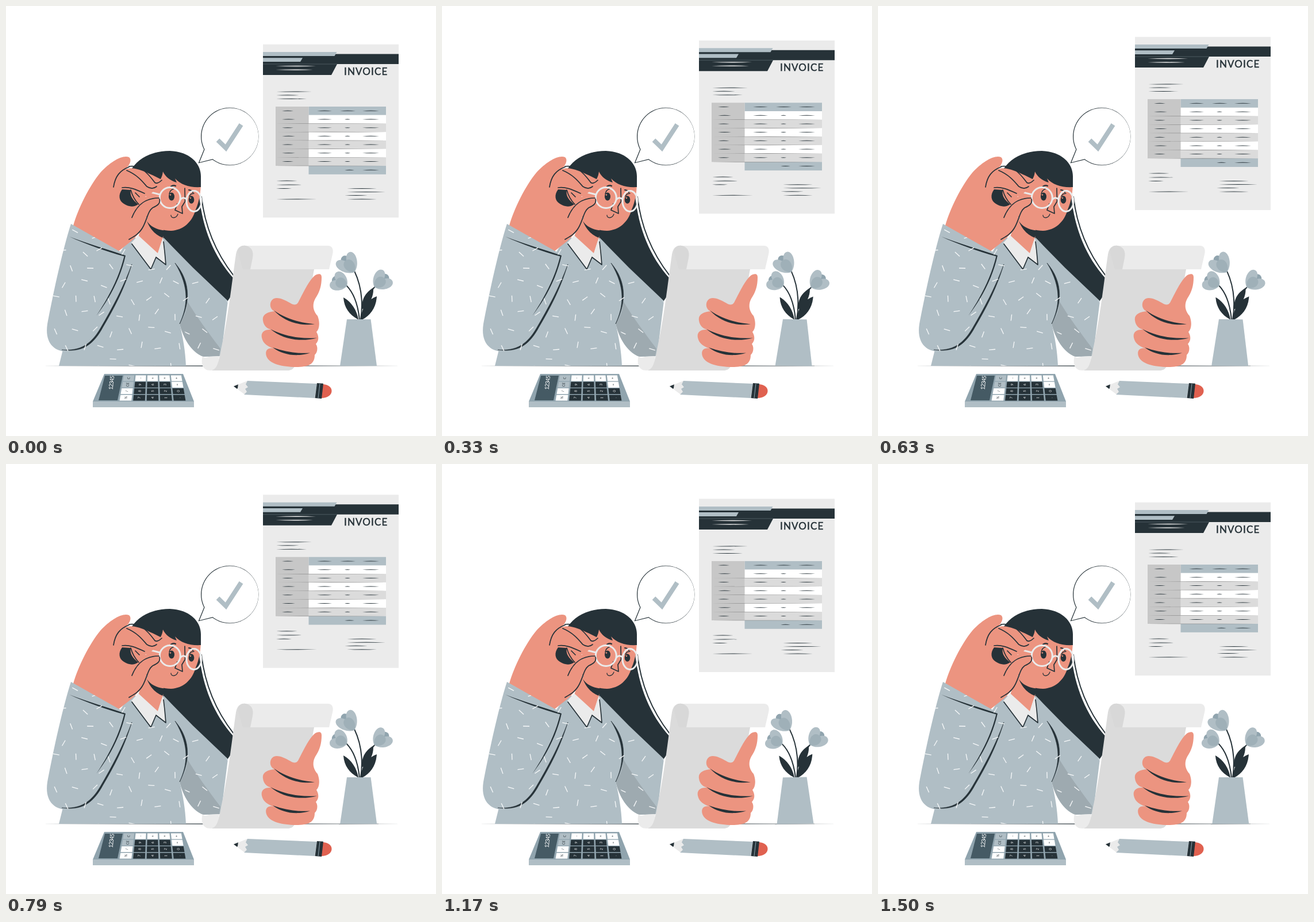
Write an HTML page that moves like this. It is 748 px wide and 748 px high and loops after 1.54 s.

```html
<!DOCTYPE html>
<html lang="en">
<head>
<meta charset="utf-8">
<title>Invoice check</title>
<style>
html, body { margin: 0; width: 100%; height: 100%; overflow: hidden; background: #fff; }
svg { display: block; width: 100vw; height: 100vh; }
.ink { fill: #263238; }
.blue { fill: #b0bec5; }
.pale { fill: #ebebeb; }
.grey { fill: #dbdbdb; }
.skin { fill: #ec9480; }
.pen { fill: none; stroke: #263238; stroke-linecap: round; stroke-linejoin: round; }
.rim { fill: none; stroke: #ebebeb; stroke-width: 3; }
</style>
</head>
<body>
<svg viewBox="0 0 748 748" stroke-width="1.7" xmlns="http://www.w3.org/2000/svg">
  <defs>
    <clipPath id="knit">
      <path d="M92 626L100 597L205 420L220 403L252 456L276 425L386 515L373 609L343 610L303 556L313 626Z"/>
      <path d="M113 379C98 425 80 510 72 553C67 585 83 601 106 601C140 602 158 574 176 543L219 450L207 432Z"/>
    </clipPath>
  </defs>

  <path class="ink" d="M58 626Q374 624.800 691 626Q374 627.400 58 626Z"/>

  <g id="invoice">
    <path class="pale" d="M447 66.7H683V368H447Z"/>
    <path class="ink" d="M447 83.5H683V101H576L566 120H447Z"/>
    <path class="blue" d="M447 80H575.500L571.500 87H447ZM447 90.200H516L512 97H447Z"/>
    <path d="M447 101H576" stroke="#66747b" stroke-width=".6"/>
    <text x="588" y="119.800" font-family="Lato, sans-serif" font-size="17" letter-spacing="1.15" fill="#263238" stroke="#263238" stroke-width=".5">INVOICE</text>
    <g id="table"></g>
    <g id="rules" class="ink"></g>
  </g>

  <!-- speech bubble -->
  <path class="ink" d="M344.500 249L334.500 273.500L361 267Z"/>
  <circle class="ink" cx="389.200" cy="227" r="50.200"/>
  <circle cx="389.700" cy="227" r="49.500" fill="#fff"/>
  <path d="M345.800 249L336.500 272L361 265.700L370 250Z" fill="#fff"/>
  <path d="M368.500 233.300L382.500 247L409 206.300" fill="none" stroke="#b0bec5" stroke-width="8"/>

  <!-- long hair -->
  <path class="ink" d="M243 365L336 330C342 388 362 436 396 474V498L381 520L274 412Z"/>
  <path class="pen" d="M340 332C346 384 364 428 396 469" stroke-width="2"/>

  <!-- torso and far arm -->
  <path class="blue" d="M274 403L325 455L386 513L374 609L343 610C322 602 308 578 302 552Z"/>
  <path d="M315 513C333 543 352 568 373 596L371 609L343 610C322 601 308 578 302 552C310 541 316 528 315 513Z" fill="#9eaab0"/>
  <path class="blue" d="M92 626L101 590L205 418L222 401L264 431L274 403C298 425 309 450 314 472C320 503 313 531 302 552C308 578 312 600 313 626Z"/>
  <path class="ink" d="M294 447C318 475 324 510 302 553C316 522 320 490 294 447Z" stroke="#263238" stroke-width=".6"/>

  <!-- neck and collar -->
  <path class="skin" d="M242 368L230 401L264 431L274 400L274 385Z"/>
  <path class="ink" d="M245 374C254 388 270 391 287 391L277 396L272 403C260 398 251 389 245 374Z"/>
  <path class="pale" d="M230 399L218 412L252 457L261 437L277 449V425L273 402L264 430Z"/>
  <path class="pen" d="M219 414L252 458L261 437L278 450C277 440 277 432 274 410"/>

  <!-- head -->
  <path class="skin" d="M268 285C252 300 238 335 243 362C251 384 268 391 287 391C308 390 324 376 330 354C336 340 339 325 339 305L300 280Z"/>
  <path class="ink" d="M216 288C228 264 256 252 285 252C317 253 339 272 339 296V315C319 316 304 311 294 300L297 307C286 304 277 297 273 288C272 297 268 306 259 310L235 320Z"/>
  <ellipse class="ink" cx="288" cy="331.500" rx="5" ry="7"/>
  <ellipse class="ink" cx="322.500" cy="337" rx="4.800" ry="6.800"/>
  <g fill="#ec9480"><circle cx="286" cy="328.500" r="1.200"/><circle cx="321" cy="334" r="1.200"/></g>
  <path class="pen" d="M284 327C285 322 288 319 292 318M319 331L322 327L327 326" stroke-width="1.500"/>
  <path class="pen" d="M287 314Q291 311 295 313M318 320Q322 320 325 324" stroke-width="2.200"/>
  <path class="pen" d="M311 317L311.500 340L306 349L307 361L294 355L298 344"/>
  <path class="pen" d="M287 364C287 370 296 370 299 362" stroke-width="1.300"/>
  <circle class="rim" cx="285.300" cy="333.500" r="18"/>
  <ellipse class="rim" cx="327" cy="339.500" rx="13" ry="18"/>
  <path class="rim" d="M303 337Q308 331 314 336M252 324L268 328"/>

  <!-- raised hand -->
  <path class="skin" d="M117 382C125 353 145 313 164 290C181 271 203 258 214 263C220 268 214 278 208 284C226 276 258 297 271 302C273 310 267 315 260 316C256 326 248 330 242 332L266 333C270 338 267 345 258 349C246 356 245 366 241 377C235 398 214 412 195 427Z"/>
  <path class="ink" d="M202 319C195 328 196 339 205 344C214 350 223 350 230 345C220 337 215 330 217 320Z"/>
  <path class="pen" d="M187 315C190 296 198 286 214 280M214 279C233 276 246 290 258 306C260 310 266 308 271 303M210 286C229 294 238 306 245 314C251 318 257 318 262 314M202 316C214 314 226 319 241 326M217 320C220 331 225 339 231 345M219 368C229 343 245 334 266 334M267 336C269 343 264 347 255 351C247 357 246 369 239 383C232 397 221 402 214 406M225 325L232 332"/>

  <!-- raised sleeve -->
  <path class="blue" d="M113 379C98 425 80 510 72 553C67 585 83 601 106 601C140 602 158 574 176 543L219 450L207 432Z"/>
  <path class="ink" d="M110 401C140 413 178 424 208 434C200 470 183 505 157 539C181 503 197 470 205.500 435.500C175 427 140 415 110 401Z"/>
  <path class="ink" d="M219 449C205 495 186 529 169 558C151 592 130 603 97 598C130 600.500 148 588 164 561C185 525 203 492 219 449Z" stroke="#263238" stroke-width=".5"/>
  <g id="flecks" clip-path="url(#knit)" stroke="#f7f9fa" stroke-width="1.300"></g>

  <!-- scroll -->
  <path class="grey" d="M400 432C402 420 409 416 416 417L536 440V458L509 602C505 626 501 634 490 634H357C367 630 371 616 374 597C386 545 393 480 400 432Z"/>
  <path class="pale" d="M413 417H560C568 417 570 424 568 432L562 458H425L418 425Z"/>
  <path d="M403 426C406 419 411 416 417 417C428 419 431 428 429 438L425 458H412Z" fill="#d8d8d8"/>
  <path class="pale" d="M342 609C344 613 349 612 353 610L371 609C369 624 365 634 355 634C343 634 338 623 342 609Z"/>

  <!-- thumb and fingers -->
  <path class="skin" d="M549 472C549 464 542 466 537 469C527 477 517 499 508 516C505 521 499 520 495 517C484 511 474 506 466 509C458 513 457 526 467 531C456 532 445 536 447 547C448 556 454 561 461 563C449 562 443 568 445 577C447 588 457 593 466 596C455 593 450 600 453 609C457 622 480 628 505 628C528 628 537 622 537 607C542 603 543 593 539 588C546 580 543 572 540 567C546 561 546 549 542 539C533 529 533 518 538 509C546 497 549 486 549 472Z"/>
  <g class="ink">
    <path d="M466 529.500C488 545 512 551 537 553.500C510 557 484 549 466 529.500Z"/>
    <path d="M460 562C486 575 512 579 541 577.500C512 585 481 580 460 562Z"/>
    <path d="M464 594C486 602 508 605 529 603.500C506 611 481 607 464 594Z"/>
  </g>

  <g id="plant">
    <path class="pen" d="M617 546C622 512 617 484 606 461M615 546C612 516 604 498 592 486M618 546C623 515 632 498 643 487" stroke-width="2"/>
    <path class="ink" d="M612 545C597 537 588 524 587 507C600 514 610 528 613 545ZM619 546C617 527 627 512 645 505C644 525 634 538 619 546ZM619 528C618 510 625 499 639 490C640 508 631 520 619 528Z"/>
    <g id="flowers"></g>
    <path class="blue" d="M593 545H634.500L645 626H581Z"/>
  </g>

  <!-- pencil -->
  <path class="pale" d="M396 661.500L420 652L424 676L414 675Z"/>
  <path class="ink" d="M396 661.500L404 658.200C403 661 404 664 402 666Z"/>
  <path class="blue" d="M420 652L541 657L537 682L414 676L419 671L416 666L421 663L417 658Z"/>
  <path d="M550 658C573 658 572 683 547 682Z" fill="#e06150"/>
  <path class="ink" d="M541 656L552 656.800L549 683L537.500 682Z"/>
  <path d="M546 657L543 682" stroke="#90a4ae" stroke-width="1"/>

  <!-- calculator -->
  <path d="M171 640H308L327 688H151Z" fill="#90a4ae"/>
  <path class="blue" d="M151 688H327V698H151Z"/>
  <path d="M172 643H203L194 686H161Z" fill="#455a64"/>
  <text transform="translate(185.500 668) rotate(-83)" font-family="Lato, sans-serif" font-size="10" letter-spacing="-1" fill="#fff">12345</text>
  <g id="keys" font-family="Lato, sans-serif" font-size="6" text-anchor="middle"></g>
</svg>

<script>
const $ = id => document.getElementById(id);
const rect = (x, y, w, h, fill) => `<rect x="${x}" y="${y}" width="${w}" height="${h}" fill="${fill}"/>`;

// Brush line, thick in the middle and pointed at both ends
const brush = (x1, x2, y, h = 1, attr = '') => {
  const m = (x1 + x2) / 2;
  return `<path d="M${x1} ${y}Q${m} ${y - h} ${x2} ${y}Q${m} ${y + h} ${x1} ${y}Z" ${attr}/>`;
};

function drawTable() {
  const top = 175, row = 14.72;
  const fills = ['#b0bec5', '#fff', '#dbdbdb', '#fff', '#dbdbdb', '#fff', '#dbdbdb', '#b0bec5'];
  let out = fills.map((f, i) => rect(526.5, top + i * row, 134.500, row + .1, f)).join('');
  out += rect(469, top, 57.5, row * 7, '#c7c7c7');
  for (let i = 2; i < 8; i++) out += brush(469, 661, top + i * row, .6, 'fill="#777"');
  $('table').innerHTML = out;

  let lines = '';
  for (let i = 0; i < 8; i++) {
    const y = top + 7.2 + i * row;
    if (i < 7) lines += brush(480, 500 + i % 2 * 3, y) + brush(541, 567, y);
    lines += i ? brush(589, i < 7 ? 599 : 606, y) : brush(581, 608, y);
    lines += brush(620, 649, y);
  }
  const text = [
    [470, 532, 149], [470, 510, 155], [470, 523, 161.5],
    [470, 507, 304], [470, 514, 311], [470, 497, 317.5], [470, 541, 336],
    [593, 645, 317.5], [593, 660, 323.5], [589, 629, 329.5], [593, 645, 336]
  ];
  lines += text.map(a => brush(...a)).join('');
  lines += brush(469, 539, 104.500, 1.5, 'fill="#ebebeb"') + brush(469, 534, 111, 1.500, 'fill="#ebebeb"');
  $('rules').innerHTML = lines;
}

function drawKeys() {
  const rows = [['C', '-', '+', '×', '+'], ['CE', '9', '6', '3', '='], ['/', '8', '5', '2', '0'], ['%', '7', '4', '1', '.']];
  const px = (u, y) => {
    const k = (y - 642) / 45;
    return 204 - 8 * k + u * (102 + 16 * k);
  };
  let out = '';
  rows.forEach((keys, r) => keys.forEach((label, c) => {
    const y1 = 642.5 + r * 11.300, y2 = y1 + 10;
    const u1 = c / 5 + .012, u2 = (c + 1) / 5 - .012;
    const soft = c === 0 && r < 2;
    const light = r === 0 || c === 0 || (c === 4 && r === 1);
    const fill = soft ? '#b0bec5' : light ? '#fff' : '#263238';
    const ink = light ? '#263238' : '#fff';
    out += `<path d="M${px(u1, y1)} ${y1}H${px(u2, y1)}L${px(u2, y2)} ${y2}H${px(u1, y2)}Z" fill="${fill}"/>`;
    const x = px((u1 + u2) / 2, y1 + 5);
    out += `<text transform="translate(${x + 2} ${y1 + 5}) rotate(-86)" fill="${ink}">${label}</text>`;
  }));
  $('keys').innerHTML = out;
}

function drawFlecks() {
  let seed = 19, out = '';
  const rnd = () => (seed = (seed * 16807) % 2147483647) / 2147483647;
  for (let r = 0; r < 9; r++) {
    for (let c = 0; c < 10; c++) {
      const x = 80 + c * 33 + r % 2 * 16 + rnd() * 10;
      const y = 390 + r * 28 + rnd() * 14;
      const a = rnd() * Math.PI, dx = 5.5 * Math.cos(a), dy = 5.5 * Math.sin(a);
      out += `<path d="M${x - dx} ${y - dy}L${x + dx} ${y + dy}"/>`;
    }
  }
  $('flecks').innerHTML = out;
}

// Bell of three petals opening from its stalk at (x, y)
function flower(x, y, angle, len) {
  const petal = (turn, size, fill) => {
    const l = len * size;
    return `<path d="M0 0C${l * .3} -13 ${l} -11 ${l} 0C${l} 11 ${l * .3} 13 0 0Z" transform="translate(${x} ${y}) rotate(${angle + turn})" fill="${fill}"/>`;
  };
  return petal(0, .95, '#90a4ae') + petal(-24, 1, '#b0bec5') + petal(24, 1, '#b0bec5') + petal(0, .7, '#9fb0b8');
}

function drawFlowers() {
  $('flowers').innerHTML = flower(606, 463, -127, 36) + flower(593, 487, -152, 30) + flower(641, 489, -41, 33);
}

const LOOP = 1540, STEP = LOOP / 37;
const lift = [[0, 0], [170, -4.2], [500, -10.7], [720, -13.7], [960, -10.4], [1170, -6], [1500, 0], [LOOP, 0]];

// Smooth curve through the lift points, level at both ends
function liftAt(t) {
  let i = 0;
  while (i < lift.length - 2 && t >= lift[i + 1][0]) i++;
  const slope = k => {
    const a = lift[k - 1], b = lift[k + 1];
    return a && b ? (b[1] - a[1]) / (b[0] - a[0]) : 0;
  };
  const [t0, y0] = lift[i], [t1, y1] = lift[i + 1];
  const d = t1 - t0, s = (t - t0) / d, s2 = s * s, s3 = s2 * s;
  return y0 + (y1 - y0) * (3 * s2 - 2 * s3)
    + d * (slope(i) * (s3 - 2 * s2 + s) + slope(i + 1) * (s3 - s2));
}

function draw(ms) {
  const t = Math.floor((ms % LOOP) / STEP) * STEP;
  const sway = 1.05 * Math.sin(2 * Math.PI * t / LOOP);
  $('invoice').setAttribute('transform', `translate(0 ${liftAt(t).toFixed(2)})`);
  $('plant').setAttribute('transform', `rotate(${sway.toFixed(3)} 613 545)`);
}

drawTable();
drawKeys();
drawFlecks();
drawFlowers();
const start = performance.now();
function tick() {
  draw(performance.now() - start);
  requestAnimationFrame(tick);
}
tick();
</script>
</body>
</html>
```
